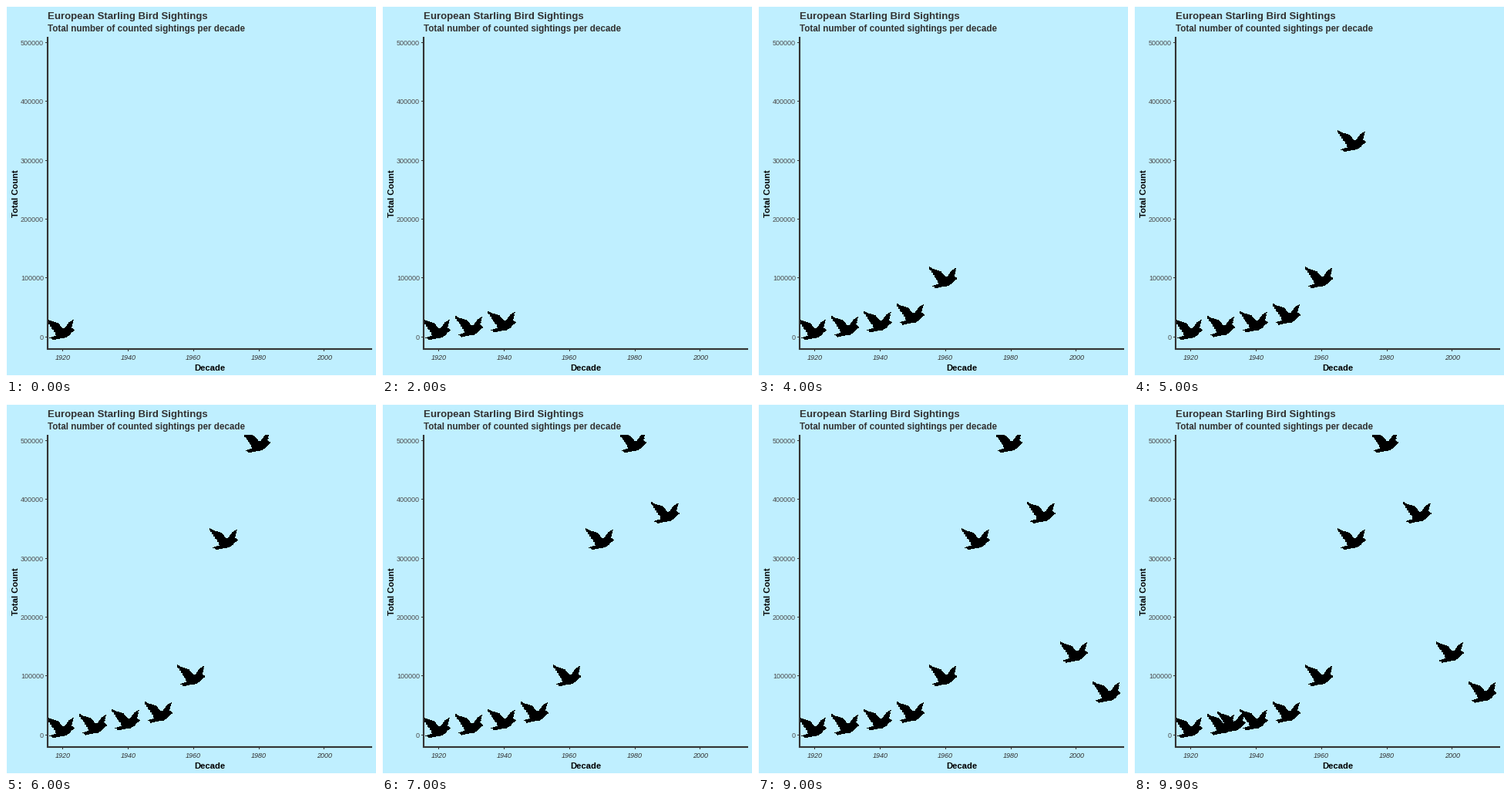
Animation, 480 px wide and 480 px high, one loop 10000 ms. Source, as a matplotlib script:

```python
import math

import matplotlib.pyplot as plt
from matplotlib.animation import FuncAnimation
from matplotlib.patches import Polygon, Rectangle

SIZE, DPI = 480, 72          # at 72 dpi one point equals one pixel
STEP_MS, PER_DECADE, HOLD = 100, 10, 6
SKY, DARK, GREY = "#BFEFFF", "#333333", "#4D4D4D"

# Sightings in thousands for each decade, 1920 to 2010
COUNTS = [12, 17, 25, 38, 100, 332, 497, 377, 140, 72]


def x_pos(decade):
    return 73.6 + 42.4 * decade


def y_pos(thousands):
    return 428.6 - 0.763 * thousands


# Top-left corner of each bird
SPOTS = [(x_pos(i) - 20.8, y_pos(c) - 13.4) for i, c in enumerate(COUNTS)]


def fringe(start, end, feathers, depth):
    """Zigzag from start to end, notched to the right of the direction."""
    (x0, y0), (x1, y1) = start, end
    dx, dy = x1 - x0, y1 - y0
    length = math.hypot(dx, dy)
    points = []
    for i in range(2 * feathers + 1):
        t, notch = i / (2 * feathers), depth * (i % 2) / length
        points.append((x0 + dx * t - dy * notch, y0 + dy * t + dx * notch))
    return points


BIRD = (
    [(0, 0), (4, 2.6), (10, 4.3), (14.5, 5.8), (18, 10), (20.5, 13),
     (24, 12), (27, 8), (29, 5)]                           # wing tops
    + fringe((34.5, 1.5), (32, 12), 3, 1)                  # right wing
    + [(35.5, 14.5), (32, 17), (29, 20.5), (24, 23.8), (16, 25)]  # head, belly
    + fringe((8, 26.8), (4, 24.6), 1, 1)                   # tail
    + [(13, 22)]
    + fringe((11.5, 19), (0.5, 3), 5, 1.3)                 # left wing
)

fig = plt.figure(figsize=(SIZE / DPI, SIZE / DPI), dpi=DPI, facecolor=SKY)
ax = fig.add_axes([0, 0, 1, 1])
ax.set_xlim(0, SIZE)
ax.set_ylim(SIZE, 0)
ax.axis("off")


def box(x, y, w, h, color):
    ax.add_patch(Rectangle((x, y), w, h, fc=color, lw=0, zorder=3,
                           antialiased=False))


def label(x, y, text, size, color=DARK, **kw):
    ax.text(x, y, text, fontsize=size, color=color,
            family="Liberation Sans", **kw)


def make_bird():
    bird = Polygon(BIRD, fc="black", lw=0, antialiased=False, zorder=2)
    ax.add_patch(bird)
    bird.set_clip_path(panel)
    return bird


def place(bird, x, y):
    bird.set_xy([(x + px, y + py) for px, py in BIRD])


panel = Rectangle((54, 40), 421, 405, fc="none", lw=0)
ax.add_patch(panel)

# White frame, open on the right
box(0, 0, SIZE, 1, "white")
box(0, SIZE - 1, SIZE, 1, "white")
box(0, 0, 1, SIZE, "white")

# Axis lines, ticks and tick labels
for xs, ys in (((54, 54), (40, 446)), ((53, 475), (445, 445))):
    ax.plot(xs, ys, color=DARK, lw=2.13, zorder=3, snap=False,
            solid_capstyle="butt")
for i in range(6):
    y = y_pos(100 * i)
    box(51, round(y), 2, 1, DARK)
    label(49, y + 4, str(100000 * i), 9, GREY, ha="right")
for i in range(0, 10, 2):
    x = x_pos(i)
    box(int(x), 446, 1, 2, DARK)
    label(x, 459, str(1920 + 10 * i), 9, ha="center", style="italic")

label(54, 17, "European Starling Bird Sightings", 13.2, weight="bold")
label(54, 33, "Total number of counted sightings per decade", 11.6,
      weight="bold")
label(264, 473, "Decade", 11.3, "black", ha="center", weight="bold")
label(18.3, 243.5, "Total Count", 11.3, "black", ha="right", va="center",
      rotation=90, weight="bold")

marks = [make_bird() for _ in SPOTS]
for mark, spot in zip(marks, SPOTS):
    place(mark, *spot)
flyer = make_bird()


def draw(n):
    decade, step = divmod(n, PER_DECADE)
    for i, mark in enumerate(marks):
        mark.set_visible(i <= decade)
    t = max(0, step - HOLD) / (PER_DECADE - HOLD)
    ease = (1 - math.cos(math.pi * t)) / 2
    (x0, y0), (x1, y1) = SPOTS[decade], SPOTS[(decade + 1) % len(SPOTS)]
    place(flyer, x0 + (x1 - x0) * ease, y0 + (y1 - y0) * ease)
    return marks + [flyer]


anim = FuncAnimation(fig, draw, frames=PER_DECADE * len(SPOTS),
                     interval=STEP_MS, repeat=True, repeat_delay=0)
plt.show()
```
